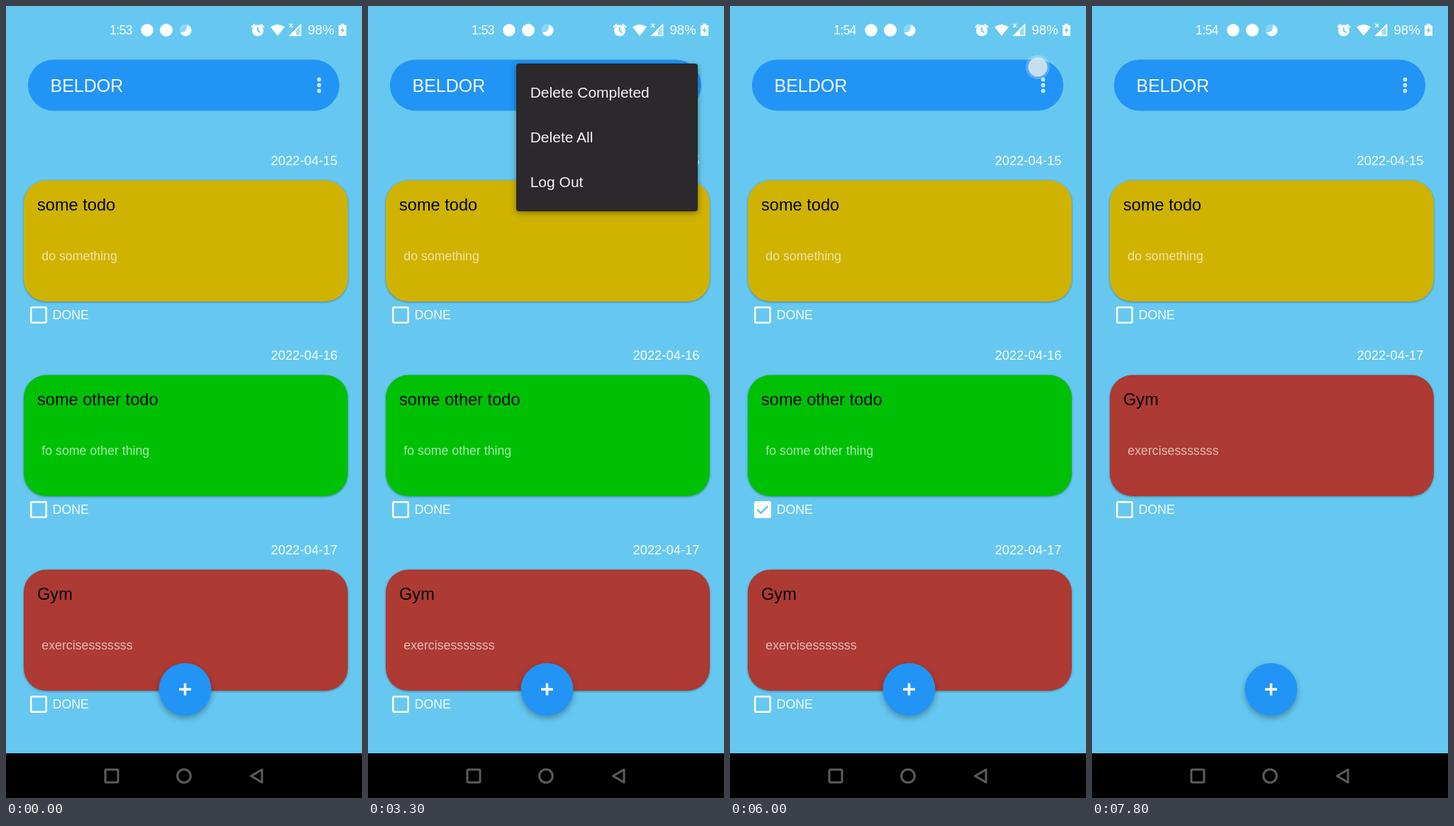
Write an HTML page that moves like this. It is 502x1115 px and loops after 8000 ms.

```html
<!DOCTYPE html>
<html lang="en">
<head>
<meta charset="utf-8">
<title>Todo list</title>
<style>
  html, body { margin: 0; width: 100%; height: 100%; overflow: hidden; background: #66c8f0; }
  svg { display: block; width: 502px; height: 1115px; font-family: "Liberation Sans", Arial, sans-serif; }
  .light { fill: #fff; fill-opacity: .94; }
  .title { font-size: 23.6px; fill: #050505; }
  .note { font-size: 17.75px; fill: #fff; fill-opacity: .65; }
  .label { font-size: 17.7px; }
  .date { font-size: 18.4px; text-anchor: end; }
  .entry { font-size: 21px; fill: #f4f4f5; }
  .card { filter: drop-shadow(0 1px 1.5px rgba(0, 0, 0, .35)); }
  .fab { filter: drop-shadow(0 4px 4px rgba(0, 0, 0, .3)); }
  .panel { filter: drop-shadow(0 2px 4px rgba(0, 0, 0, .4)); }
</style>
</head>
<body>
<svg viewBox="0 0 502 1115">
  <defs>
    <clipPath id="reveal"><rect id="window" y="65"/></clipPath>
  </defs>
  <rect width="502" height="1115" fill="#66c8f0"/>

  <!-- status bar -->
  <g fill="#fff">
    <text id="clock" class="light" x="146" y="40" font-size="18" letter-spacing="-.8"></text>
    <circle cx="199" cy="34" r="8.7"/>
    <circle cx="226" cy="34" r="9"/>
    <circle cx="253" cy="34" r="8.5" opacity=".25"/>
    <path d="M255 26.5A8 8 0 1 1 246 37Q256 38 255 26.5Z"/>
    <circle cx="355" cy="34.5" r="8"/>
    <path d="M346 30l5-4.5M364 30l-5-4.5" stroke="#fff" stroke-width="2.2"/>
    <path d="M355 30v5l3.5 2.5" fill="none" stroke="#66c8f0" stroke-width="1.8"/>
    <path d="M373 29.5Q383 22.5 393 29.5L383 42Z"/>
    <path d="M416 25V42H399Z" opacity=".35"/>
    <path d="M415.5 26.5V41.5H400.5Z" fill="none" stroke="#fff" stroke-width="1.6"/>
    <path d="M409 33V42H400Z"/>
    <path d="M399.5 25l4.5 5M404 25l-4.5 5" stroke="#fff" stroke-width="1.3"/>
    <text class="light" x="425.5" y="40" font-size="18.6">98%</text>
    <path d="M472 25h5v2h3v15h-11V27h3Z"/>
    <path d="M475.5 29l-4 6h2.6l-.8 4.500 4.200-6.200h-2.700Z" fill="#66c8f0"/>
  </g>

  <!-- app bar -->
  <rect x="31" y="75.500" width="439" height="72" rx="36" fill="#2194f5"/>
  <text class="light" x="62.500" y="121" font-size="25">BELDOR</text>
  <g fill="#fff" fill-opacity=".75">
    <circle cx="441.500" cy="103.500" r="2.900"/>
    <circle cx="441.500" cy="111.500" r="2.900"/>
    <circle cx="441.500" cy="119.500" r="2.900"/>
  </g>

  <g id="list"></g>

  <g class="fab"><circle cx="252.500" cy="962" r="37" fill="#2194f5"/></g>
  <path d="M244 962h17M252.500 953.500v17" stroke="#fff" stroke-width="3.500"/>

  <!-- overflow menu -->
  <g id="menu" clip-path="url(#reveal)">
    <rect class="panel" x="209" y="81" width="256" height="208" rx="4" fill="#2b292c"/>
    <rect id="press" x="209" y="91" width="256" height="62.500" fill="#fff"/>
    <text class="entry" x="228.700" y="129">Delete Completed</text>
    <text class="entry" x="228.700" y="192">Delete All</text>
    <text class="entry" x="228.700" y="255">Log Out</text>
  </g>

  <g id="touch">
    <circle r="17" fill="#fff" fill-opacity=".22"/>
    <circle r="13.500" fill="#e2e9ed" fill-opacity=".82"/>
  </g>

  <!-- navigation bar -->
  <rect y="1052" width="502" height="63"/>
  <g fill="none" stroke="#5c5c5c" stroke-width="3" stroke-linejoin="round">
    <rect x="140" y="1075" width="18" height="18" rx="1.500"/>
    <circle cx="251" cy="1084" r="9.300"/>
    <path d="M361 1075V1093L345.500 1084Z"/>
  </g>
</svg>
<script>
const LOOP = 8000, STEP = 100, PITCH = 274;
const $ = id => document.getElementById(id);

const todos = [
  { date: "2022-04-15", title: "some todo", note: "do something", color: "#cfb300" },
  { date: "2022-04-16", title: "some other todo", note: "fo some other thing", color: "#00c006" },
  { date: "2022-04-17", title: "Gym", note: "exercisesssssss", color: "#ad3a33" }
];

$("list").innerHTML = todos.map(d => `
  <g class="todo">
    <text class="light date" x="467.5" y="224">${d.date}</text>
    <rect class="card" x="25" y="245.500" width="457" height="170.500" rx="32" fill="${d.color}"/>
    <text class="title" x="44" y="288">${d.title}</text>
    <text class="note" x="50.300" y="358">${d.note}</text>
    <rect x="35.300" y="424.300" width="21.400" height="21.400" rx="1.500"
      fill="none" stroke="#fff" stroke-width="2.500"/>
    <g class="tick" opacity="0">
      <rect x="34.500" y="423.500" width="23" height="23" rx="2" fill="#fff"/>
      <path d="M38.500 435l5 5 10-10" fill="none" stroke="#66c8f0" stroke-width="2.600"/>
    </g>
    <text class="light label" x="65.700" y="441">DONE</text>
  </g>`).join("");

const cards = [...document.querySelectorAll(".todo")];
const tick = cards[1].querySelector(".tick");

// [time, value] keys
const menuAlpha = [[1600, 0], [1800, 1], [3900, 1], [4000, .48], [4200, 0],
  [6100, 0], [6300, 1], [7500, 1], [7600, .48], [7800, 0]];
const menuOpen = [[1600, 0], [2000, 1], [4200, 1], [4201, 0], [6100, 0], [6500, 1]];
const pressAlpha = [[3800, 0], [3900, .14], [4200, .14], [4201, 0], [7400, 0], [7500, .14]];
const tickAlpha = [[5100, 0], [5300, 1]];

// touches: start, x, y
const taps = [[1500, 441, 119.5], [3800, 330, 122], [5100, 46, 709], [6000, 434, 86], [7400, 330, 122]];
const tapAlpha = [[0, 1], [100, 1], [300, 0]];

function track(keys, t) {
  const i = keys.findIndex(k => k[0] > t);
  if (i < 0) return keys[keys.length - 1][1];
  if (i === 0) return keys[0][1];
  const [t0, v0] = keys[i - 1], [t1, v1] = keys[i];
  return v0 + (v1 - v0) * (t - t0) / (t1 - t0);
}

function place(card, row) {
  card.setAttribute("transform", `translate(0 ${row * PITCH})`);
}

function render(t) {
  $("clock").textContent = t < 3400 ? "1:53" : "1:54";

  const open = 1 - (1 - track(menuOpen, t)) ** 2;
  $("menu").setAttribute("opacity", track(menuAlpha, t));
  $("press").setAttribute("opacity", track(pressAlpha, t));
  $("window").setAttribute("x", 480 - 285 * open);
  $("window").setAttribute("width", 285 * open);
  $("window").setAttribute("height", 245 * open);

  const tap = taps.find(([s]) => t >= s && t < s + 300);
  $("touch").setAttribute("opacity", tap ? track(tapAlpha, t - tap[0]) : 0);
  if (tap) $("touch").setAttribute("transform", `translate(${tap[1]} ${tap[2]})`);

  const removed = t >= 7700;
  tick.setAttribute("opacity", track(tickAlpha, t));
  cards[1].style.display = removed ? "none" : "";
  cards.forEach((card, i) => place(card, removed && i === 2 ? 1 : i));
}

const start = performance.now();
function loop() {
  const t = (performance.now() - start) % LOOP;
  render(Math.floor(t / STEP) * STEP);
  requestAnimationFrame(loop);
}
loop();
</script>
</body>
</html>
```
